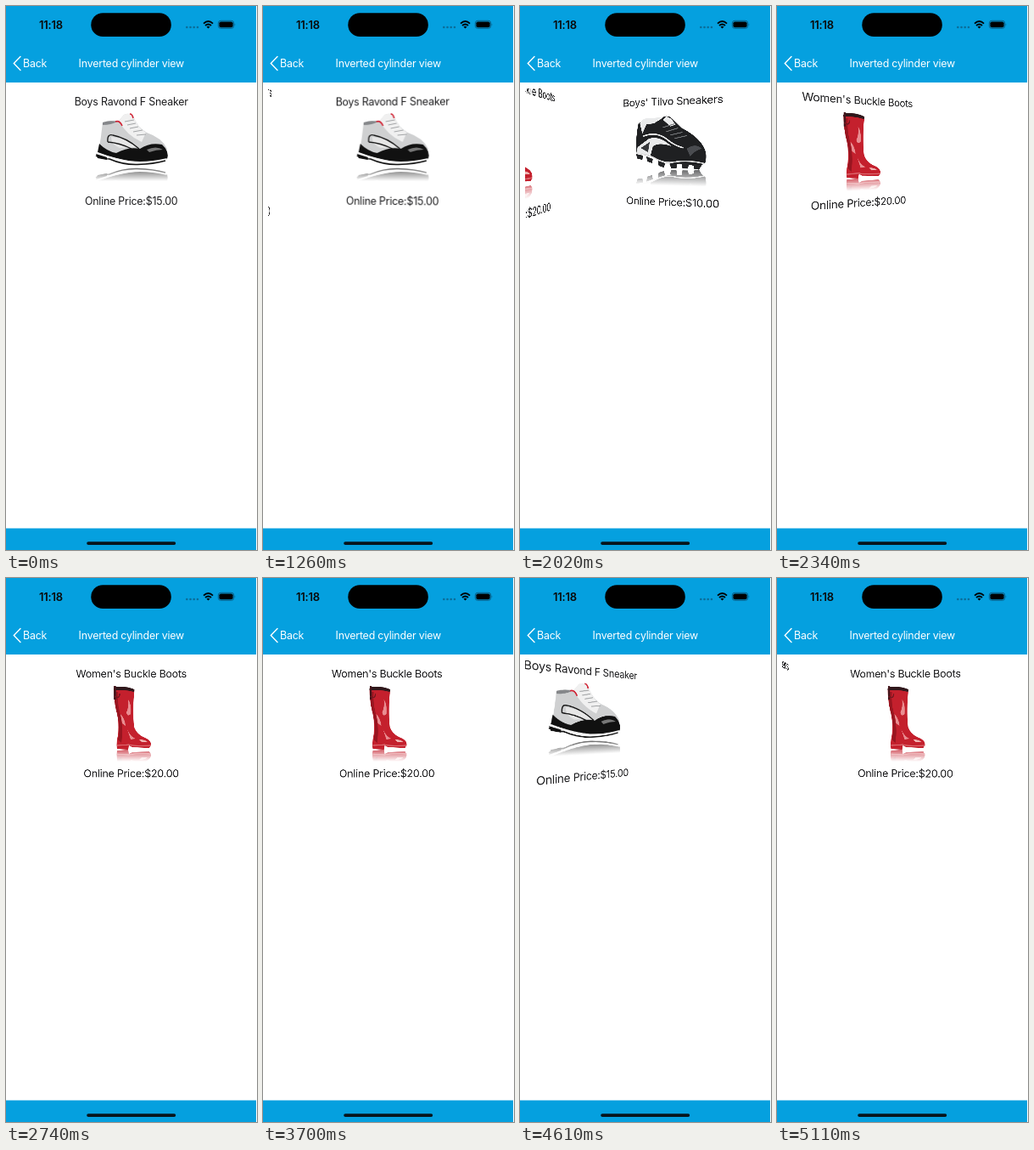
Recreate the animation shown at these times as an HTML page. Size 296 by 640 pixels, loop 5220 ms.

```html
<!DOCTYPE html>
<html lang="en">
<head>
<meta charset="utf-8">
<title>Inverted cylinder view</title>
<style>
  html, body { margin: 0; width: 100%; height: 100%; overflow: hidden; background: #fff; }
  svg { position: absolute; display: block; }
  text { font: 12.4px Inter, "Liberation Sans", sans-serif; letter-spacing: -.2px; fill: #1c1c1e; }
  #chrome { left: 0; top: 0; }
  #chrome text { fill: #fff; }
  #chrome .clock { font-size: 13px; font-weight: 600; fill: #0a0a0a; }
  #carousel { position: absolute; left: 6px; top: 97px; width: 283px; height: 152px;
    overflow: hidden; perspective: 376px; }
  .item { position: absolute; inset: 0; will-change: transform; }
  .item svg { left: 0; top: 0; overflow: visible; }
</style>
</head>
<body>
<svg id="chrome" width="296" height="640" viewBox="0 0 296 640">
  <defs>
    <linearGradient id="fade" x1="0" y1="0" x2="0" y2="1">
      <stop offset="0" stop-color="#fff" stop-opacity=".7"/>
      <stop offset="1" stop-color="#fff" stop-opacity="0"/>
    </linearGradient>
  </defs>
  <path fill="#05a0df" d="M0 0H295V90.1H0ZM0 614.6H295V640H0Z"/>
  <rect x="100.3" y="8.3" width="94.5" height="27.8" rx="13.9"/>
  <text class="clock" x="39" y="26.7">11:18</text>
  <g fill="#0b6c98">
    <circle cx="213.3" cy="25" r="1.3"/><circle cx="217.5" cy="25" r="1.3"/>
    <circle cx="221.7" cy="25" r="1.3"/><circle cx="225.9" cy="25" r="1.3"/>
  </g>
  <path d="M233 20.6Q238.5 15.6 244 20.6M235 23Q238.5 20 242 23" fill="none" stroke="#000" stroke-width="1.9"/>
  <path d="M236.5 24.4Q238.5 23 240.5 24.4L238.5 26.6Z"/>
  <rect x="250.3" y="17.3" width="18.4" height="9" rx="2.8" fill="none" stroke="#0a5478" stroke-width=".8"/>
  <rect x="251.4" y="18.4" width="16.2" height="6.8" rx="1.9"/>
  <path d="M269.7 20.4q1.4 1.4 0 2.8z" fill="#0a5478"/>
  <path d="M17 59.6L9.3 67.5L17 75.4" fill="none" stroke="#fff" stroke-width="1.4" stroke-linecap="round"/>
  <text x="20" y="71.9">Back</text>
  <text x="147.8" y="71.9" text-anchor="middle">Inverted cylinder view</text>
  <rect x="95.2" y="630.2" width="105" height="3.8" rx="1.9" fill="#07151c"/>
</svg>
<div id="carousel"></div>

<script>
const LOOP = 5220, RADIUS = 119.3;

const highTop = `
  <path fill="#cfd0d1" d="M114 137Q123 134 133 135L139 128Q146 125 150 129Q154 142 166 149Q184 155 190 168L186 176L140 180L109 172Q112 156 114 137Z"/>
  <path fill="#f0f0f0" d="M133 135L139 128Q146 125 150 129Q154 142 165 149L160 160Q142 152 133 135Z"/>
  <path fill="#e6e6e6" d="M124 154Q140 155 154 166L134 167Q124 163 124 154Z"/>
  <path fill="#85878a" d="M114 137Q122 134 131 136Q124 140 114 140Z"/>
  <path fill="none" stroke="#a3a5a7" d="M140 136l11-2M143 140l10-2M146 144l10-2M150 148l11-2M154 152l11-1"/>
  <path fill="none" stroke="#d12334" stroke-width="1.6" d="M129 136Q134 134 137 141M146 127Q149 127 150 132"/>
  <path fill="none" stroke="#161616" stroke-width="1.3" d="M120 160Q119 150 126 152Q142 155 157 168M120 160Q134 161 148 168"/>
  <path fill="#111" d="M110 162Q119 171 130 173Q145 165 158 168Q170 160 184 163Q193 171 190 180Q172 184 152 183Q132 181 108 172Z"/>
  <path fill="#777" d="M166 169Q177 164 185 169Q177 169 169 172Z"/>
  <path fill="#f4f4f4" d="M107 172Q122 178 138 181Q160 186 190 179L188 182Q162 188 140 185Q120 180 106 175Z"/>
  <path fill="none" stroke="#111" stroke-width="1.4" d="M106 176Q112 180 122 180Q138 187 155 186.500Q174 186 188 182"/>
  <path fill="#111" d="M106 174L119 178L119 181L108 179Z"/>`;

const cleat = `
  <path fill="#1f2022" d="M108 138Q115 133 121 137Q131 138 138 131Q144 128 149 133L160 144Q177 153 184 164Q190 173 187 184L180 189Q162 184 150 186Q136 184 126 178L106 173Q104 158 108 138Z"/>
  <path fill="#e9eaeb" d="M110 138Q113 131 120 132L136 131L128 138L118 139Q115 146 113 150ZM138 134l4-4 6 3 5 7-6 2Z"/>
  <path fill="#e9eaeb" d="M107 166L121 156Q134 152 148 165Q134 160 126 165L123 176L106 173Z"/>
  <path fill="#36383b" d="M111 167L122 160L120 172Z"/>
  <path fill="none" stroke="#e9e9e9" stroke-width="1.6" d="M114 153Q130 147 143 157Q151 164 162 167"/>
  <path fill="none" stroke="#77797c" d="M138 143l14-4M142 148l14-4M147 152l14-3M152 156l14-3"/>
  <path fill="#4a4c50" d="M166 168Q176 161 183 168Q174 171 170 177Z"/>
  <path fill="none" stroke="#ddd" stroke-width="1.4" d="M106 173Q122 175 130 180Q142 186 154 183Q170 181 186 185"/>
  <path fill="#252628" d="M105 174l9 2-1 5-6-1zM118 177l8 3-1 5-6-2zM132 182l9 3-2 5-6-2zM146 186l9-1-1 6-6 0zM160 185l9 0-2 6-6 0zM174 186l9 1-3 5-6-1z"/>`;

const boot = `
  <path fill="#c4202d" d="M127 130Q140 128 151.500 131Q149 155 151 175Q154 184 164 188Q171 191 171 196L169 200L149 199L145 197L144 202L131 201Q130 197 131 190Q134 176 131 160Q127 145 127 130Z"/>
  <path fill="#991520" d="M128 134Q127 146 131 160Q135 176 132 190L136 194Q139 176 134 158Q131 146 132 134Z"/>
  <path fill="#30181c" d="M127 130Q129 127 132 128Q142 127 151.500 131L151 134Q140 131 127 132Z"/>
  <path fill="none" stroke="#43161c" stroke-width="2.4" d="M128.500 127V143"/>
  <path fill="none" stroke="#741720" stroke-width="1.4" d="M128 139Q134 143 134 136"/>
  <path fill="#e98d91" d="M144 143Q148 148 147 160Q143 164 142 158Q145 152 144 143ZM135 160Q140 165 141 174L137 171ZM143 178Q147 187 153 189L147 190Z"/>
  <path fill="#f0b2b1" d="M157 190Q164 190 167 193L160 193Z"/>
  <path fill="none" stroke="#dc6b71" stroke-width="1.2" d="M131 197L145 196Q150 198 171 197"/>`;

const loafer = `
  <path fill="#5c5048" d="M109 154Q118 150 128 155Q138 160 147 152Q158 160 174 166Q189 172 188 183L108 184Q106 168 109 154Z"/>
  <path fill="#3a322d" d="M111 155Q128 149 146 154Q136 164 124 160Z"/>
  <path fill="none" stroke="#85766b" stroke-width="2" d="M140 164Q152 163 158 172"/>
  <path fill="#24201e" d="M107 183H188L187 188H107Z"/>`;

// Listed from the centre towards the left
const items = [
  { title: "Boys Ravond F Sneaker", price: "15.00", art: highTop, floor: 189, depth: 17 },
  { title: "Boys' Tilvo Sneakers", price: "10.00", art: cleat, floor: 192, depth: 19 },
  { title: "Women's Buckle Boots", price: "20.00", art: boot, floor: 202, depth: 14 },
  { title: "Women's Suede Loafers", price: "8.00", art: loafer, floor: 189, depth: 15 }
];

// Turn of the cylinder in degrees: [time, angle]
const drag1 = [[0, 0], [1260, 2.2], [1380, 9], [1480, 18], [1590, 29], [1690, 41], [1790, 56]];
const drag2 = [[3700, -.7], [3840, -2.8], [3950, -6], [4060, -10.5], [4160, -16.3], [4260, -26], [4380, -64]];

// Constant deceleration that stops at time "stop"
const coast = (times, stop, k) => times.map(t => [t, -k * (stop - t) ** 2]);
const shift = (list, by) => list.map(([t, a]) => [t, a + by]);

const turns = [
  ...drag1,
  ...shift(coast([1900, 2020, 2120, 2240, 2340, 2440, 2540, 2640, 2740], 2740, 1.454e-4), 180),
  ...shift(drag2, 180),
  ...shift(coast([4490, 4610, 4710, 4810, 4910, 5010, 5110], 5170, -4.67e-4), -180)
];
turns.push([LOOP, turns[turns.length - 1][1]]);

const wrap = a => ((a + 180) % 360 + 360) % 360 - 180;

function pose([time, turn], slot) {
  const a = wrap(turn - 90 * slot);
  return {
    offset: time / LOOP,
    easing: "steps(1, end)",
    opacity: a > -89.99 && a < 45 ? 1 : 0,
    transform: `translateZ(${RADIUS}px) rotateY(${-a}deg) translateZ(${-RADIUS}px)`
  };
}

items.forEach((item, i) => {
  const { title, price, art, floor, depth } = item;
  const el = document.createElement("div");
  el.className = "item";
  el.innerHTML = `<svg width="283" height="152" viewBox="6 97 283 152">
    <mask id="mirror${i}" maskUnits="userSpaceOnUse" x="90" y="${floor}" width="116" height="${depth}">
      <rect x="90" y="${floor}" width="116" height="${depth}" fill="url(#fade)"/>
    </mask>
    <g mask="url(#mirror${i})"><g transform="matrix(1 0 0 -1 0 ${2 * floor})">${art}</g></g>
    ${art}
    <text x="147.7" y="117" text-anchor="middle">${title}</text>
    <text x="147.7" y="234.4" text-anchor="middle">Online Price:$${price}</text>
  </svg>`;
  document.getElementById("carousel").append(el);
  el.animate(turns.map(step => pose(step, i)), { duration: LOOP, iterations: Infinity });
});
</script>
</body>
</html>
```
